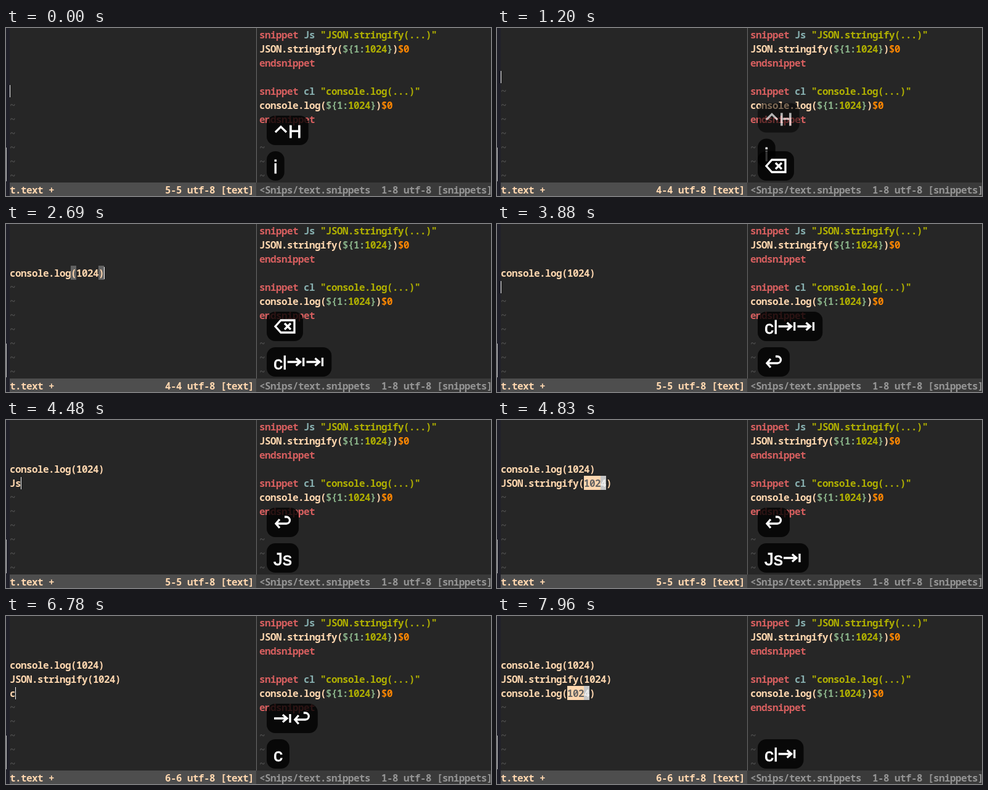
These frames come from a looping animation (787 by 274 pixels, 8 s). An HTML page:

```html
<!DOCTYPE html>
<html lang="en">
<head>
<meta charset="utf-8">
<title>Snippet expansion</title>
<style>
html, body { margin: 0; width: 100%; height: 100%; overflow: hidden; background: #262626; }
svg { display: block; width: 787px; height: 274px; }
text { font: 600 16px "Noto Sans Mono", "DejaVu Sans Mono", monospace; letter-spacing: -.6px; white-space: pre; }
.cap text { font: 30px "Liberation Sans", Arial, sans-serif; letter-spacing: 0; fill: #fff; stroke: #fff; stroke-width: .8; }
.cap path { fill: none; stroke: #fff; stroke-width: 3.3; }
</style>
</head>
<body>
<svg id="stage" viewBox="0 0 787 274"></svg>
<script>
const LOOP = 8000, CW = 9, RH = 23, LEFT = 6, RIGHT = 411;
const FG = '#ffd7af', RED = '#d75f5f', BLUE = '#87afaf', AQUA = '#87af87',
      GREEN = '#afaf00', ORANGE = '#ff8700', DIM = '#4e4e4e';
const stage = document.getElementById('stage');

// Moments at which the picture is refreshed
const STEPS = [0, 1140, 1200, 1260, 1320, 1920, 2030, 2090, 2270, 2330, 2630, 2690,
  3170, 3230, 3290, 3350, 4180, 4360, 4420, 4480, 4770, 4830, 5190, 5250, 5310, 5360,
  5420, 5780, 5830, 6610, 6660, 6720, 6780, 6840, 6900, 7070, 7130, 7790, 7840, 7900, 7960];

// Editor: time, row of the cursor, text in that row, mode
const LOG = 'console.log(1024)', JSN = 'JSON.stringify(1024)';
const EDITS = [
  [0, 4, ''], [1140, 3, ''], [1920, 3, 'c'], [2030, 3, 'cl'],
  [2270, 3, LOG, 'select'], [2630, 3, LOG, 'match'],
  [3170, 4, ''], [4180, 4, 'J'], [4420, 4, 'Js'],
  [4770, 4, JSN, 'select'], [5190, 4, JSN, 'match'],
  [5780, 5, ''], [6610, 5, 'c'], [6840, 5, 'cl'], [7070, 5, LOG, 'select']
];

// Key display: time, leaving caption, upper caption, lower caption
const KEYS = [
  [0, '', '^H', 'i'], [1140, '^H', 'i', '⌫'], [1920, 'i', '⌫', 'c'],
  [2090, '', '⌫', 'cl'], [2330, '', '⌫', 'cl⇥'], [2690, '', '⌫', 'cl⇥⇥'],
  [3170, '⌫', 'cl⇥⇥', '↩'], [4120, 'cl⇥⇥', '↩', 'J'],
  [4480, '', '↩', 'Js'], [4830, '', '↩', 'Js⇥'],
  [5190, '↩', 'Js⇥', '⇥'], [5830, '', 'Js⇥', '⇥↩'],
  [6610, 'Js⇥', '⇥↩', 'c'], [6900, '', '⇥↩', 'cl'], [7130, '', '⇥↩', 'cl⇥']
];

const ADVANCE = { i: 6.7, l: 6.7, c: 15, s: 15, J: 15, H: 21.7, '^': 24, '⇥': 30.8, '↩': 30, '⌫': 37 };
const ICONS = {
  '^': 'M3 3 12-6 21 3',
  '⇥': 'M1 0H22M15-6 22 0 15 6M27-7V7',
  '↩': 'M10-5 4 2 10 9M4 2H21a5.5 5.5 0 0 0 0-11H18',
  '⌫': 'M3 0 12-10H34V10H12ZM18-5l10 10m0-10l-10 10'
};

const last = (list, t) => list.filter(e => e[0] <= t).pop();
const rect = (x, y, w, h, fill) => `<rect x="${x}" y="${y}" width="${w}" height="${h}" fill="${fill}"/>`;
const put = (x, row, str, fill = FG) => `<text x="${x}" y="${17 + row * RH}" fill="${fill}">${str.replace('<', '&lt;')}</text>`;
const cell = (col, row, n, fill) => rect(LEFT + col * CW, row * RH - 1, n * CW, RH, fill);

// A row made of [text, colour] pieces
function line(row, ...parts) {
  let x = RIGHT;
  return parts.map(([str, fill]) => {
    const out = put(x, row, str, fill);
    x += str.length * CW;
    return out;
  }).join('');
}

function snippet(row, key, call) {
  return line(row, ['snippet ', RED], [key + ' ', BLUE], [`"${call}(...)"`, GREEN]) +
    line(row + 1, [call + '(', FG], ['${1:', AQUA], ['1024', GREEN], ['}', AQUA], [')', FG], ['$0', ORANGE]) +
    line(row + 2, ['endsnippet', RED]);
}

function tildes(x, from) {
  let out = '';
  for (let r = from; r < 11; r++) out += put(x, r, '~', DIM);
  return out;
}

const frame = rect(0, 0, 787, 274, '#262626') + rect(0, 0, 6, 274, '#20202a') +
  rect(0, 195, 1, 55, '#c8c8c8') + rect(406, 0, 1, 252, '#6c6c6c') +
  rect(6, 252, 400, 22, DIM) + rect(406, 252, 381, 22, '#3a3a3a') +
  snippet(0, 'Js', 'JSON.stringify') + snippet(4, 'cl', 'console.log') + tildes(RIGHT, 8) +
  put(LEFT, 11, 't.text +') + put(RIGHT, 11, '<Snips/text.snippets  1-8 utf-8 [snippets]', '#949494');

function editor(t) {
  const [, row, str, mode] = last(EDITS, t), n = str.length, open = n - 6;
  let out = tildes(LEFT, row + 1) + put(258, 11, `${row + 1}-${row + 1} utf-8 [text]`);
  if (row > 3 && t >= 3170) out += put(LEFT, 3, LOG);
  if (row > 4) out += put(LEFT, 4, JSN);
  if (mode === 'match') out += cell(open, row, 1, '#626262') + cell(n - 1, row, 1, '#626262');
  out += put(LEFT, row, str);
  if (mode === 'select') {
    const x = LEFT + (open + 1) * CW;
    return out + cell(open + 1, row, 3, FG) + cell(open + 4, row, 1, '#c6c6c6') +
      put(x, row, '102', '#626262') + put(x + 3 * CW, row, '4', '#eeeeee');
  }
  return out + rect(LEFT + n * CW, row * RH + 1, 1, 20, '#f4f4f4');
}

function caption(str, y, alpha = 1) {
  if (!str || alpha <= 0) return '';
  let x = 434, glyphs = '';
  for (const ch of str) {
    glyphs += ICONS[ch]
      ? `<path d="${ICONS[ch]}" transform="translate(${x} ${y + 24})"/>`
      : `<text x="${x}" y="${y + 36}">${ch}</text>`;
    x += ADVANCE[ch];
  }
  return `<g class="cap" opacity="${alpha}"><rect x="423" y="${y}" width="${x - 412}" height="48" rx="14" fill="#000" fill-opacity=".8"/>${glyphs}</g>`;
}

function keys(t) {
  const [start, old, upper, lower] = last(KEYS, t);
  const p = old ? Math.min(1, (t - start) / 170) : 1;
  const fade = t < 7790 ? 1 : 1 - (t - 7740) / 220;
  return caption(old, 143 - 58 * p, 1 - p) + caption(upper, 201 - 58 * p, fade) +
    (p > 0 ? caption(lower, 201) : '');
}

let shown = -1;
function draw(now) {
  const time = now % LOOP, t = STEPS.filter(s => s <= time).pop();
  if (t !== shown) stage.innerHTML = frame + editor(t) + keys(t);
  shown = t;
  requestAnimationFrame(draw);
}
draw(0);
</script>
</body>
</html>
```
